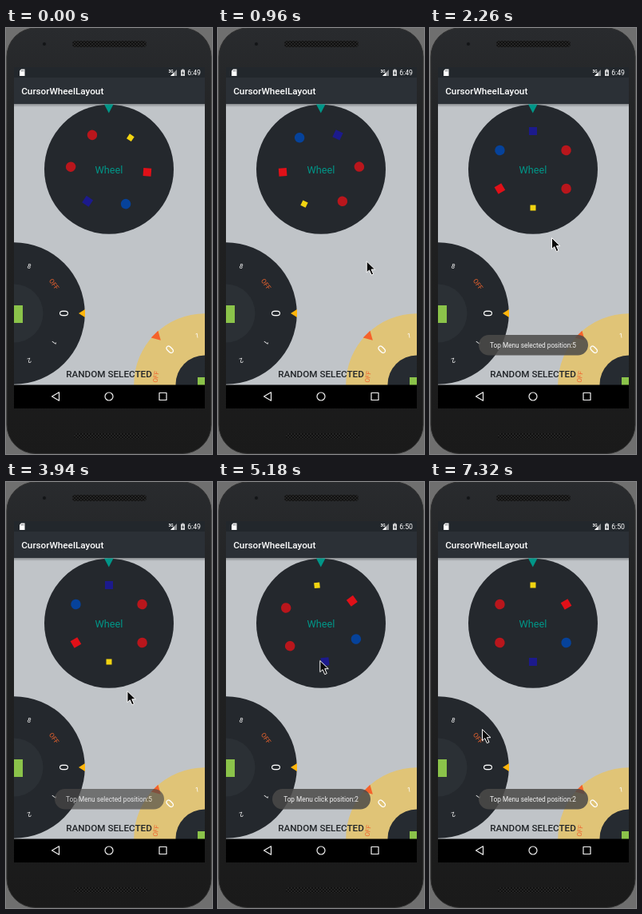
An HTML page that plays this animation: 258 by 533 pixels, repeating every 8 s.

```html
<!DOCTYPE html>
<html lang="en">
<head>
<meta charset="utf-8">
<title>Cursor wheel</title>
<style>
  html, body { margin: 0; width: 100%; height: 100%; overflow: hidden; background: #6f6f6f; }
  svg { display: block; width: 258px; height: 533px; }
  text { font-family: Roboto, "Noto Sans", sans-serif; }
  .mid { text-anchor: middle; }
</style>
</head>
<body>
<svg viewBox="0 0 258 533" xmlns="http://www.w3.org/2000/svg">
  <defs>
    <clipPath id="screen"><rect x="10" y="95" width="239" height="352"/></clipPath>
    <linearGradient id="body" x1="0" y1="0" x2="0" y2="1">
      <stop offset="0" stop-color="#292b2e"/>
      <stop offset=".25" stop-color="#222324"/>
      <stop offset="1" stop-color="#1a1a1a"/>
    </linearGradient>
    <linearGradient id="shade" x1="0" y1="0" x2="0" y2="1">
      <stop offset="0" stop-color="#000" stop-opacity=".3"/>
      <stop offset="1" stop-color="#000" stop-opacity="0"/>
    </linearGradient>
    <pattern id="mesh" width="4" height="4" patternUnits="userSpaceOnUse">
      <rect width="4" height="4" fill="#111"/>
      <path d="M0 0L4 4M4 0L0 4" stroke="#2a2a2a" stroke-width=".8"/>
    </pattern>
  </defs>

  <!-- phone body -->
  <rect x="1" y="0" width="256" height="532.5" rx="36" fill="url(#body)" stroke="#303030"/>
  <rect x="83" y="16" width="93" height="8" rx="4" fill="url(#mesh)"/>
  <rect x="85" y="507" width="92" height="7" rx="3.5" fill="url(#mesh)"/>
  <circle cx="48" cy="20" r="2.5" fill="#121416" stroke="#2b2d30" stroke-width=".8"/>

  <!-- screen -->
  <rect x="10" y="49" width="239" height="427" fill="#c0c4c8"/>
  <g clip-path="url(#screen)" class="mid">
    <rect x="10" y="95" width="239" height="4" fill="url(#shade)"/>
    <circle cx="129" cy="176.7" r="81" fill="#24282d"/>
    <path d="M123 95.500H134.500L128.800 106.500Z" fill="#009688"/>
    <text x="129" y="181.800" font-size="12.700" fill="#009688">Wheel</text>
    <g id="wheel"></g>
    <g id="left"></g>
    <g id="right"></g>
    <text x="129" y="437" font-size="11.700" font-weight="500" fill="#202428">RANDOM SELECTED</text>
  </g>

  <!-- bars -->
  <rect x="10" y="49" width="239" height="13" fill="#22272c"/>
  <rect x="10" y="62" width="239" height="33" fill="#2b3036"/>
  <text x="19.200" y="83" font-size="11.750" font-weight="500" fill="#fff">CursorWheelLayout</text>
  <path d="M19 51.500H23.500V60H17V53.500Z" fill="#fff"/>
  <path d="M19.300 52.800v1.500M20.700 52.800v1.500M22.100 52.800v1.500" stroke="#22272c" stroke-width=".6"/>
  <text x="203.500" y="55.500" font-size="5" font-weight="700" fill="#fff">3G</text>
  <path d="M214 52V60H206Z" fill="#8d9093"/>
  <path d="M210.500 55.500V60H206Z" fill="#fff"/>
  <path d="M219 52.500H220.500V51.500H222.500V52.500H224V60H219Z" fill="#d5d6d7"/>
  <path d="M222 53.500L220.200 57H221.500L221 59.200L223 56H221.700Z" fill="#22272c"/>
  <text id="clock" x="244" y="59.300" font-size="8.700" text-anchor="end" fill="#fff"></text>
  <rect x="10" y="446.500" width="239" height="29.500" fill="#000"/>
  <g fill="none" stroke="#f2f2f2" stroke-width="1.200" stroke-linejoin="round">
    <path d="M57.500 461L66.500 455.800V466.200Z"/>
    <circle cx="129" cy="461" r="5"/>
    <rect x="192" y="456.500" width="9" height="9"/>
  </g>

  <g id="toasts" class="mid"></g>
  <path id="cursor" d="M0 0V14.200L3.300 11.200L5.900 17.200L8.500 16L5.900 10.200H10.500Z"
    fill="#0b0b0b" stroke="#fff" stroke-linejoin="round"/>
</svg>

<script>
const NS = "http://www.w3.org/2000/svg";
const LOOP = 8000;
const $ = id => document.getElementById(id);

function add(parent, tag, attrs, text) {
  const el = document.createElementNS(NS, tag);
  for (const k in attrs) el.setAttribute(k, attrs[k]);
  if (text) el.textContent = text;
  return parent.appendChild(el);
}

const ramp = (t, from, to) => Math.min(1, Math.max(0, (t - from) / (to - from)));
const smooth = p => p * p * (3 - 2 * p);

// Top wheel: plain marks, clockwise from the top
const marks = [
  ["#f2d411", 7, 0], ["#e01018", 10, 0], ["#06429a", 12.5, 1],
  ["#1c1a8c", 10, 0], ["#b9161c", 12.5, 1], ["#b9161c", 12.5, 1]
];
marks.forEach(([fill, size, round], i) => add($("wheel"), "rect", {
  x: -size / 2, y: -48 - size / 2, width: size, height: size,
  rx: round * size / 2, fill, transform: `rotate(${i * 60})`
}));

// Corner dials: labels stand 36 degrees apart, the selected "0" sits at "turn"
function dial(id, cx, cy, turn, face, hub, labels, pointer, half, tip) {
  const g = $(id);
  g.setAttribute("transform", `translate(${cx} ${cy})`);
  add(g, "circle", { r: 88.8, fill: face });
  add(g, "circle", { r: 36.5, fill: hub });
  const zero = labels.indexOf("0");
  labels.forEach((label, i) => add(g, "text", {
    transform: `rotate(${turn + (i - zero) * 36}) translate(0 -62)`,
    y: i === zero ? 5.3 : 2.9,
    "font-size": i === zero ? 15 : 8.2,
    fill: label === "OFF" ? "#f0642e" : "#fff"
  }, label));
  add(g, "path", { d: `M${-half} -89H${half}L0 ${-tip}Z`, transform: `rotate(${turn})`, fill: pointer });
}
dial("left", 10, 357, 90, "#24282d", "#2b3035", ["8", "OFF", "0", "1", "2"], "#ffb50c", 5, 81);
dial("right", 249, 446, -45, "#e0c477", "#262b31", ["OFF", "0", "1"], "#f5622b", 6.2, 78);
add($("left"), "rect", { x: -11, y: -10, width: 22, height: 22, fill: "#8bc34a" });
add($("right"), "rect", { x: -9, y: -9, width: 18, height: 18, fill: "#8bc34a" });

function toast(label, width, from, to) {
  const el = add($("toasts"), "g", {});
  add(el, "rect", {
    x: 129.5 - width / 2, y: 384, width, height: 25.5, rx: 12.7,
    fill: "#4b4a49", "fill-opacity": .86
  });
  add(el, "text", { x: 129, y: 399.8, "font-size": 8.25, fill: "#f2f2f2" }, label);
  return { el, from, to };
}
const toasts = [
  toast("Top Menu selected position:5", 137, 1680, 3860),
  toast("Top Menu click position:2", 123, 4770, 6380),
  toast("Top Menu selected position:2", 137, 6780, LOOP)
];
const toastAlpha = (t, { from, to }) =>
  (1 - (1 - ramp(t, from, from + 460)) ** 2) * (1 - ramp(t, to, to + 380));

// Cursor moves: begin, end, then the point reached
const moves = [
  [720, 840, 190, 295], [840, 1420, 155.500, 266.500], [1420, 2140, 152.500, 262.500],
  [3880, 4530, 127.800, 223.500], [6320, 6950, 54, 303], [6950, 7260, 65.500, 309.500]
];
function cursorAt(t) {
  let x = 243, y = 284;
  for (const [from, to, toX, toY] of moves) {
    const p = smooth(ramp(t, from, to));
    x += (toX - x) * p;
    y += (toY - y) * p;
  }
  return [x, y];
}

// A decaying fling that snaps to the next mark, then a half turn after the click
const fling = t => 34 - 215.4 * (1 - Math.exp(-.00215 * t));
function wheelAngle(t) {
  const rest = (1 - ramp(t, 1200, 1660)) ** 2;
  const settled = -180 + (fling(Math.min(t, 1200)) + 180) * rest;
  if (t < 1200) return fling(t);
  if (t < 4770) return settled;
  return -180 * (1 - ramp(t, 4700, 5240)) ** 1.55;
}

function draw(t) {
  $("wheel").setAttribute("transform", `translate(129 177) rotate(${wheelAngle(t)})`);
  toasts.forEach(item => item.el.setAttribute("opacity", toastAlpha(t, item)));
  $("cursor").setAttribute("transform", `translate(${cursorAt(t)})`);
  $("cursor").setAttribute("visibility", t < 720 ? "hidden" : "visible");
  $("clock").textContent = t < 4890 ? "6:49" : "6:50";
}

let start;
function loop(now) {
  start ??= now;
  draw((now - start) % LOOP);
  requestAnimationFrame(loop);
}
draw(0);
requestAnimationFrame(loop);
</script>
</body>
</html>
```
